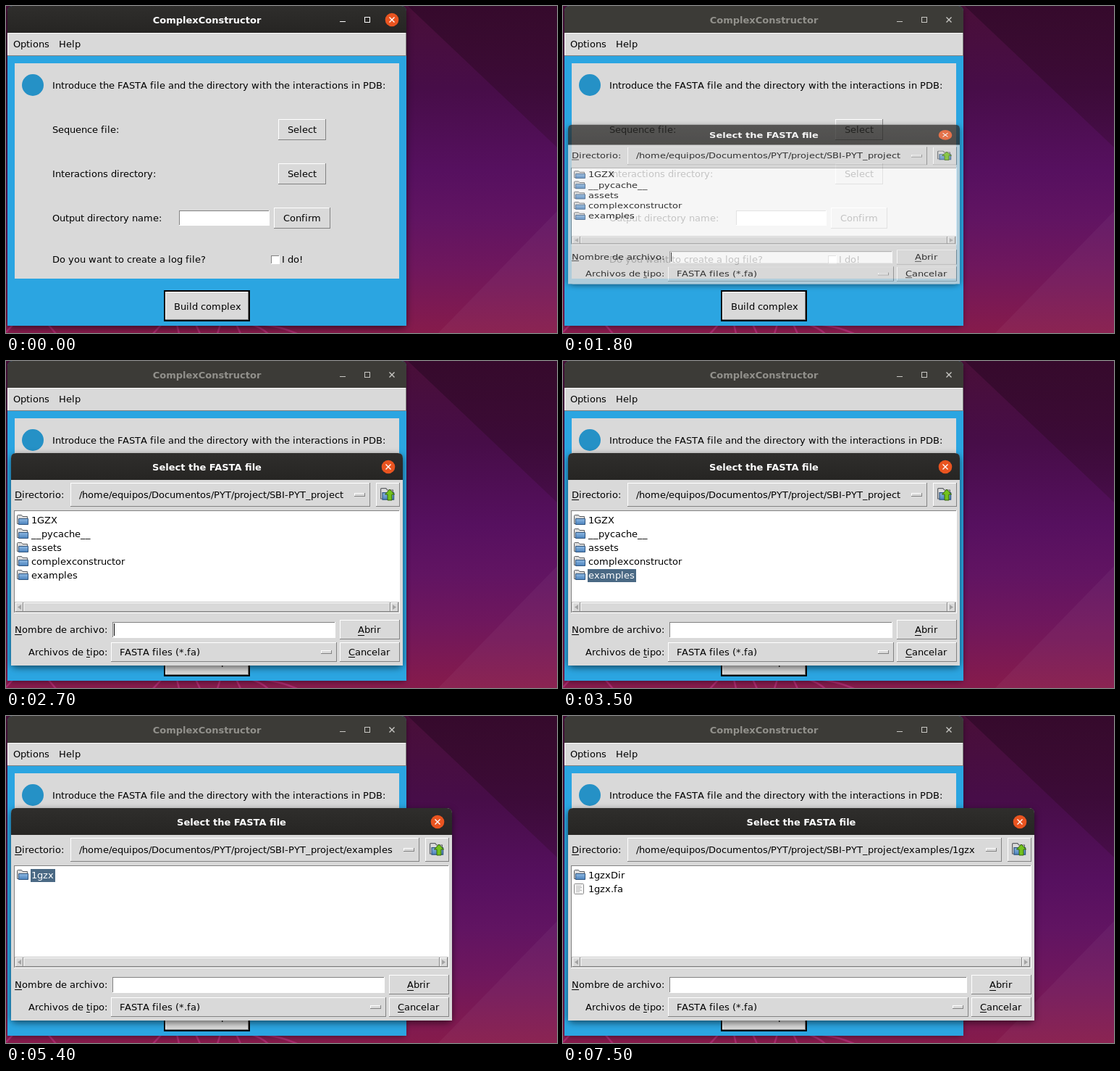
An HTML page for the animation above (8 s loop, 761 px wide and 451 px high).

```html
<!DOCTYPE html>
<html lang="en">
<head>
<meta charset="utf-8">
<title>ComplexConstructor</title>
<style>
  html, body { margin: 0; width: 100%; height: 100%; overflow: hidden; background: #4a0f38; }
  svg { display: block; width: 761px; height: 451px; }
  text { font: 13px "DejaVu Sans", sans-serif; }
  .ui { font-kerning: none; font-variant-ligatures: none; }
  .title { font-weight: bold; text-anchor: middle; }
  .focused { filter: drop-shadow(0 3px 5px rgba(0, 0, 0, .55)); }
  .unfocused { filter: drop-shadow(0 2px 3px rgba(0, 0, 0, .35)); }
  .opening { transform-origin: 0 273.5px; animation: open 8s step-end infinite; }
  @keyframes open {
    0% { transform: scaleY(.75); opacity: .77; }
    23.75%, 100% { transform: none; opacity: 1; }
  }
</style>
</head>
<body>
<svg id="stage" viewBox="0 0 761 451" xmlns="http://www.w3.org/2000/svg">
  <defs>
    <linearGradient id="sky" x1="0" y1="0" x2="0" y2="1">
      <stop offset="0" stop-color="#490f38"/>
      <stop offset=".25" stop-color="#470d48"/>
      <stop offset=".5" stop-color="#56105f"/>
      <stop offset=".65" stop-color="#611462"/>
      <stop offset=".8" stop-color="#6f175d"/>
      <stop offset="1" stop-color="#861b4b"/>
    </linearGradient>
    <linearGradient id="shade" x1="0" y1="0" x2="0" y2="1">
      <stop offset="0" stop-color="#32092a" stop-opacity=".85"/>
      <stop offset="1" stop-color="#32092a" stop-opacity=".3"/>
    </linearGradient>
    <linearGradient id="bar" x1="0" y1="0" x2="0" y2="1">
      <stop offset="0" stop-color="#2f2e2c"/>
      <stop offset="1" stop-color="#262523"/>
    </linearGradient>
    <linearGradient id="blue" x1="0" y1="0" x2="0" y2="1">
      <stop offset="0" stop-color="#8db8e2"/>
      <stop offset="1" stop-color="#4b82bd"/>
    </linearGradient>
  </defs>
  <rect width="761" height="451" fill="url(#sky)"/>
  <path d="M555 0H761V195Z" fill="url(#shade)"/>
  <path d="M761 283V451H597Z" fill="#fff" opacity=".04"/>
  <path d="M10 439L0 450M58 439L69 452M215 439L203 452M236 439L239 452M262 439L268 452M296 439L292 452M318 439L324 452M338 439Q352 443 362 452M352 439Q380 442 402 452"
        fill="none" stroke="#b32f78" stroke-width="2.5" opacity=".75"/>
  <g id="desktop"></g>
</svg>
<script>
const LOOP = 8000, GRAY = '#d9d9d9', HOVER = '#ececec', DARK = '#828282';
const meter = document.createElement('canvas').getContext('2d');
meter.font = '13px "DejaVu Sans", sans-serif';
const keyframes = [];

// Visible only between two times of the loop, in ms.
function show(from, to, markup) {
  const name = 'show' + keyframes.length, pct = ms => ms / LOOP * 100 + '%';
  keyframes.push(`@keyframes ${name} { 0% { visibility: hidden } ${pct(from)} { visibility: visible }
    ${to < LOOP ? pct(to) + ' { visibility: hidden }' : ''} 100% { visibility: ${to < LOOP ? 'hidden' : 'visible'} } }`);
  return `<g style="animation: ${name} ${LOOP}ms step-end infinite">${markup}</g>`;
}

const rect = (x, y, w, h, fill, extra = '') =>
  `<rect x="${x}" y="${y}" width="${w}" height="${h}" fill="${fill}" ${extra}/>`;

const bevel = (x, y, w, h, fill, light, dark) =>
  rect(x, y, w, h, dark) + rect(x, y, w - 1, h - 1, light) + rect(x + 1, y + 1, w - 2, h - 2, fill);
const raised = (x, y, w, h, fill = GRAY) => bevel(x, y, w, h, fill, '#fff', DARK);
const sunken = (x, y, w, h, fill = '#fff') => bevel(x, y, w, h, fill, DARK, '#fff');

// Widget text advances by whole pixels, like the toolkit does.
const advance = ch => Math.round(meter.measureText(ch).width);
const textWidth = str => [...str].reduce((sum, ch) => sum + advance(ch), 0);

function label(x, middle, str, { fill = '#000', underline = -1 } = {}) {
  const xs = [...str].map((_, i) => x + textWidth(str.slice(0, i)));
  const line = underline < 0 ? '' : rect(xs[underline], middle + 7, advance(str[underline]), 1, fill);
  return `<text class="ui" x="${xs.join(' ')}" y="${middle + 5}" fill="${fill}">${str}</text>${line}`;
}

const button = (x, y, w, h, textX, str, options, fill) =>
  raised(x, y, w, h, fill) + label(textX, y + 14, str, options);

function closeButton(x, y, active) {
  const disc = active ? `<circle cx="${x}" cy="${y}" r="9.3" fill="#e95420"/>` : '';
  return disc + `<path d="M${x - 3.5} ${y - 3.5}l7 7m0 -7l-7 7" stroke="${active ? '#fff' : '#c9c8c4'}" stroke-width="1.4"/>`;
}

function titleBar(x, y, w, h, str, active) {
  const r = 7;
  return `<path d="M${x} ${y + h}V${y + r}q0 -${r} ${r} -${r}h${w - 2 * r}q${r} 0 ${r} ${r}V${y + h}Z"
      fill="${active ? 'url(#bar)' : '#3c3b37'}"/>
    <text class="title" x="${x + w / 2}" y="${y + h / 2 + 5.5}" fill="${active ? '#fff' : '#92918c'}">${str}</text>`
    + closeButton(x + w - 20, y + 19, active);
}

function mainFrame(active) {
  const ink = active ? '#fff' : '#c9c8c4';
  return rect(2, 0, 551, 441, '#2ba5e1', `rx="7" class="${active ? 'focused' : 'unfocused'}"`)
    + titleBar(2, 0, 551, 37, 'ComplexConstructor', active)
    + rect(461, 21, 8, 1, ink)
    + `<rect x="495.5" y="15.5" width="7" height="7" fill="none" stroke="${ink}"/>`;
}

function mainWindow() {
  const select = (y, fill) => button(376, y, 66, 29, 389, 'Select', {}, fill);
  return show(0, 1800, mainFrame(true)) + show(1800, LOOP, mainFrame(false))
    + rect(2, 69, 551, 372, '#2ba5e1')
    + raised(2, 37, 551, 32)
    + label(10, 52, 'Options') + label(73, 52, 'Help')
    + rect(12, 79, 531, 297, GRAY)
    + '<circle cx="37" cy="109" r="15" fill="#2591c6"/>'
    + label(64, 109, 'Introduce the FASTA file and the directory with the interactions in PDB:')
    + label(64, 170, 'Sequence file:') + select(156) + show(900, 1800, select(156, HOVER))
    + label(64, 231, 'Interactions directory:') + select(217)
    + label(64, 292, 'Output directory name:') + sunken(239, 282, 125, 21)
    + button(370, 278, 78, 29, 383, 'Confirm')
    + label(64, 349, 'Do you want to create a log file?')
    + sunken(366, 344, 12, 12) + label(381, 349, 'I do!')
    + rect(218, 392, 119, 43, '#000') + raised(220, 394, 115, 39)
    + label(232, 414, 'Build complex');
}

const folder = (x, y) => `<g transform="translate(${x} ${y})">
  <path d="M.5 12.5V1.5q0 -1 1 -1h5l1.5 2h6.5v10Z" fill="#dcdcdc" stroke="#5c5f63"/>
  <path d="M2.5 13.5V5.5h13v8Z" fill="url(#blue)" stroke="#31567f"/></g>`;

const page = (x, y) => `<g transform="translate(${x} ${y})">
  <rect x=".5" y=".5" width="13" height="14" rx="1" fill="#f6f6f6" stroke="#8a8a8a"/>
  <path d="M3 3.5h7M3 5.5h8M3 7.5h6M3 9.5h8M3 11.5h5" stroke="#b9b9b9"/></g>`;

const upIcon = x => `<g transform="translate(${x} 175) scale(1.2)">${folder(0, 0)}</g>
  <path d="M${x + 13} 177l6.5 7h-3.5v8h-6v-8h-3.5Z" fill="#73c21d" stroke="#35620c"/>`;

const item = (row, str, isFile) =>
  (isFile ? page(15, 231) : folder(15, 212 + 19 * row)) + label(35, 219 + 19 * row, str);

const selected = (row, str) =>
  rect(34, 211 + 19 * row, textWidth(str) + 3, 18, '#4a6984') + label(35, 219 + 19 * row, str, { fill: '#fff' });

function scrollBar(right) {
  const end = right - 6, arrow = '#a3a3a3';
  return rect(12, 332, right - 17, 15, '#c3c3c3')
    + raised(13, 333, 11, 13) + raised(24, 333, end - 35, 13) + raised(end - 11, 333, 11, 13)
    + `<path d="M21 336v7l-5 -3.5ZM${end - 8} 336v7l5 -3.5Z" fill="${arrow}"/>`;
}

const dirMenu = (right, path, fill) =>
  raised(89, 168, right - 134, 33, fill) + label(101, 184, path) + raised(right - 67, 182, 15, 5);

function dialog(right, path, items) {
  return rect(7, 127, right - 7, 293, GRAY, 'rx="7" class="focused"')
    + rect(7, 164, right - 7, 256, GRAY)
    + titleBar(7, 127, right - 7, 37, 'Select the FASTA file', true)
    + label(12, 184, 'Directorio:', { underline: 0 })
    + dirMenu(right, path)
    + raised(right - 37, 168, 33, 33) + upIcon(right - 31)
    + sunken(11, 206, right - 15, 142) + items + scrollBar(right)
    + label(12, 370, 'Nombre de archivo:', { underline: 0 })
    + sunken(147, 360, right - 240, 22)
    + button(right - 87, 357, 83, 27, right - 62, 'Abrir', { underline: 0 })
      .replace('y="376"', 'y="375"')
    + label(31, 401, 'Archivos de tipo:', { underline: 12 })
    + raised(145, 388, right - 236, 27) + label(157, 401, 'FASTA files (*.fa)')
    + raised(right - 113, 399, 15, 5)
    + raised(right - 87, 388, 83, 27) + label(right - 75, 401, 'Cancelar', { underline: 0 });
}

const home = '/home/equipos/Documentos/PYT/project/SBI-PYT_project';
const folders = ['1GZX', '__pycache__', 'assets', 'complexconstructor', 'examples'];
const caret = rect(149, 362, 1, 17, '#000');

const firstDialog = dialog(548, home, folders.map((name, row) => item(row, name)).join(''))
  + show(2200, 2300, dirMenu(548, home, HOVER))
  + show(1800, 2400, caret) + show(2700, 3300, caret)
  + show(3500, 4100, selected(4, 'examples'));

const secondDialog = dialog(616, home + '/examples', item(0, '1gzx'))
  + show(5400, 7500, selected(0, '1gzx'));

const thirdDialog = dialog(651, home + '/examples/1gzx', item(0, '1gzxDir') + item(1, '1gzx.fa', true));

const scene = mainWindow()
  + show(1800, 4100, `<g class="opening">${firstDialog}</g>`)
  + show(4100, 7500, secondDialog)
  + show(7500, LOOP, thirdDialog);

const sheet = document.createElement('style');
sheet.textContent = keyframes.join('\n');
document.head.append(sheet);
document.getElementById('desktop').innerHTML = scene;
</script>
</body>
</html>
```
